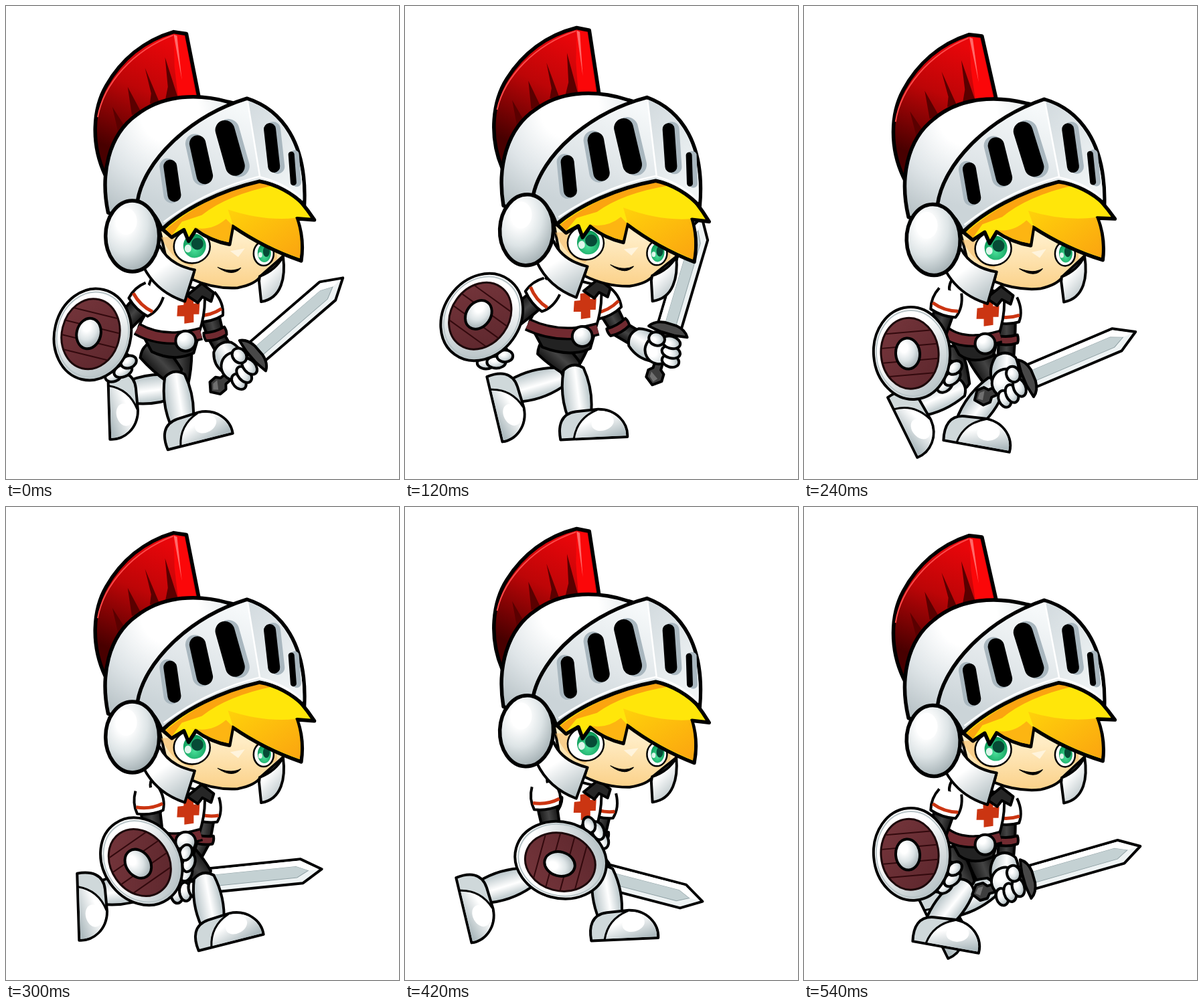
Recreate the animation shown at these times as an HTML page. Size 587 px wide and 707 px high, loop 0.6 s.

```html
<!DOCTYPE html>
<html lang="en">
<head>
<meta charset="utf-8">
<title>Running knight</title>
<style>
html, body { margin: 0; width: 100%; height: 100%; overflow: hidden; background: #fff; }
svg { display: block; width: 587px; height: 707px; }
.o { stroke: #000; stroke-width: 4; stroke-linejoin: round; }
.h { stroke: #000; stroke-width: 5.5; stroke-linejoin: round; }
.l { fill: none; stroke: #000; stroke-width: 3; stroke-linecap: round; }
</style>
</head>
<body>
<svg viewBox="0 0 587 707">
<defs>
  <linearGradient id="steel" x1=".2" y1="0" x2=".8" y2="1"><stop offset=".35" stop-color="#fff"/><stop offset="1" stop-color="#aebbbf"/></linearGradient>
  <linearGradient id="tube" x1="0" y1="0" x2="0" y2="1"><stop offset=".1" stop-color="#c3ced1"/><stop offset=".45" stop-color="#fff"/><stop offset="1" stop-color="#b4c1c5"/></linearGradient>
  <linearGradient id="dark" x1="0" y1="0" x2="0" y2="1"><stop offset="0" stop-color="#151515"/><stop offset=".5" stop-color="#444"/><stop offset="1" stop-color="#161616"/></linearGradient>
  <radialGradient id="ball" cx=".36" cy=".3" r=".78"><stop offset=".2" stop-color="#fff"/><stop offset=".55" stop-color="#dde4e6"/><stop offset="1" stop-color="#99a6aa"/></radialGradient>
  <radialGradient id="dome" gradientUnits="userSpaceOnUse" cx="245" cy="160" r="175"><stop offset=".25" stop-color="#fff"/><stop offset=".6" stop-color="#dfe5e8"/><stop offset="1" stop-color="#b2bdc1"/></radialGradient>
  <linearGradient id="visor" gradientUnits="userSpaceOnUse" x1="330" y1="145" x2="270" y2="310"><stop offset="0" stop-color="#f6f9fa"/><stop offset=".6" stop-color="#dfe5e8"/><stop offset="1" stop-color="#cbd4d8"/></linearGradient>
  <linearGradient id="side" x1="0" y1="0" x2=".7" y2="1"><stop offset="0" stop-color="#d2dade"/><stop offset="1" stop-color="#f1f5f6"/></linearGradient>
  <linearGradient id="plume" gradientUnits="userSpaceOnUse" x1="235" y1="50" x2="165" y2="215"><stop offset="0" stop-color="#e8060a"/><stop offset=".45" stop-color="#bd0507"/><stop offset="1" stop-color="#480000"/></linearGradient>
  <linearGradient id="skin" x1="0" y1="0" x2="0" y2="1"><stop offset=".3" stop-color="#ffecc4"/><stop offset="1" stop-color="#fbd189"/></linearGradient>
  <linearGradient id="fringe" x1="0" y1="0" x2="1" y2="1"><stop offset="0" stop-color="#ffd20a"/><stop offset="1" stop-color="#fba410"/></linearGradient>
  <radialGradient id="iris" cx=".5" cy=".65" r=".6"><stop offset="0" stop-color="#4be09a"/><stop offset="1" stop-color="#0a9a58"/></radialGradient>
  <linearGradient id="wood" x1="0" y1="0" x2="1" y2="1"><stop offset="0" stop-color="#76363c"/><stop offset="1" stop-color="#5c262c"/></linearGradient>
  <g id="boot">
    <path class="o" fill="#cfd8da" d="M-50,21C-53,0 -48,-18 -25,-20L8,-22C35,-21 52,0 50,21Z"/>
    <path fill="url(#steel)" d="M-29,19Q-22,-12 8,-20C34,-19 49,0 48,19Z"/>
    <ellipse cx="14" cy="-2" rx="17" ry="12" fill="#fff" transform="rotate(-14 14 -2)"/>
    <path class="l" d="M-30,20Q-24,-10 6,-21"/>
  </g>
  <g id="sleeve">
    <path class="o" fill="#fff" d="M-15,-17Q5,-26 22,-19Q27,0 21,20Q4,25 -13,17"/>
    <path fill="none" stroke="#cb3512" stroke-width="5" d="M12,-20Q18,0 11,20"/>
  </g>
</defs>
<g id="swordArm">
  <path id="armUpper" class="o" fill="url(#dark)"/>
  <path id="armLower" class="o" fill="url(#dark)"/>
  <path id="band" class="o" fill="#712a30" d="M-8,-16Q-2,-18 4,-16Q9,0 4,16Q-2,18 -8,16Q-4,0 -8,-16Z"/>
  <use id="sleeveR" href="#sleeve"/>
  <path id="gauntlet" class="o" fill="url(#tube)"/>
  <g id="sword">
    <path class="o" fill="#3e3e3e" d="M0,-6H-62L-67,-12H-78L-87,0L-78,12H-67L-62,6H0Z"/>
    <path fill="#707070" d="M-68,-7H-76L-82,0L-76,5Z"/>
    <path class="o" fill="#eef3f4" d="M4,-18H144L174,0L144,18H4Z"/>
    <path fill="#c4d1d3" stroke="#8fa0a4" d="M6,-8H136L154,0L136,9H6Z"/>
    <path fill="#fff" d="M6,-16H143L169,0L154,0L136,-8H6Z"/>
    <path class="o" fill="#484848" d="M-4,-30Q6,-24 8,-9V9Q6,24 -4,30Q-6,18 -7,10V-10Q-6,-20 -4,-30Z"/>
    <circle class="o" cx="-34" cy="-5" r="21" fill="url(#ball)"/>
    <ellipse class="o" cx="-45" cy="16" rx="9" ry="13" fill="url(#ball)"/>
    <ellipse class="o" cx="-32" cy="13" rx="9" ry="14" fill="url(#ball)"/>
    <ellipse class="o" cx="-18" cy="9" rx="9" ry="14" fill="url(#ball)"/>
    <ellipse class="o" cx="-19" cy="-13" rx="10" ry="12" fill="url(#ball)"/>
  </g>
</g>
<g id="legs">
  <path id="thighF" class="o" fill="url(#dark)"/>
  <path id="shinF" class="o" fill="url(#tube)"/>
  <use id="footF" href="#boot"/>
  <path id="thighN" class="o" fill="url(#dark)"/>
  <path id="shinN" class="o" fill="url(#tube)"/>
  <use id="footN" href="#boot"/>
</g>
<g id="torso">
  <path id="hips" class="o" fill="#222"/>
  <path id="tunic" class="o" fill="#fff"/>
  <path id="beltLine" fill="none" stroke="#000" stroke-width="20"/>
  <path id="belt" fill="none" stroke="#712a30" stroke-width="13"/>
  <path fill="#cb3512" d="M265,436L279,434L280,444L289,443L288,460L280,460L280,472L266,474L266,463L255,463L256,447L265,446Z"/>
  <path class="o" fill="#262626" d="M270,432L292,414L310,428L306,441L293,434L286,443Z"/>
  <circle class="o" cx="268" cy="500" r="15" fill="url(#ball)"/>
</g>
<path id="shieldUpper" class="o" fill="url(#dark)"/>
<use id="sleeveL" href="#sleeve"/>
<g id="shield">
  <ellipse class="o" cx="49" cy="33" rx="20" ry="18" fill="url(#ball)"/>
  <ellipse class="o" cx="45" cy="52" rx="13" ry="9" fill="url(#ball)" transform="rotate(-35 45 52)"/>
  <ellipse class="o" cx="57" cy="42" rx="14" ry="9" fill="url(#ball)" transform="rotate(-35 57 42)"/>
  <ellipse class="o" cx="62" cy="27" rx="12" ry="9" fill="url(#ball)" transform="rotate(-35 62 27)"/>
  <ellipse class="o" rx="57" ry="69" fill="url(#steel)"/>
  <ellipse rx="53" ry="64" fill="none" stroke="#b9c5c8" stroke-width="2"/>
  <ellipse cx="-3" rx="43" ry="53" fill="url(#wood)" stroke="#1c0709" stroke-width="3"/>
  <path fill="none" stroke="#32090d" stroke-width="2" d="M-36,-32H30M-44,-11H38M-44,11H38M-36,32H30"/>
  <ellipse class="o" cx="-6" rx="18" ry="23" stroke-width="3" fill="url(#ball)"/>
</g>
<g id="head">
  <path class="h" fill="url(#plume)" d="M148,252C126,205 130,152 150,118C172,80 206,51 251,38L270,41L288,134L240,160L160,255Z"/>
  <path fill="none" stroke="#ff4a4a" stroke-width="2" d="M137,165C146,115 190,66 250,43"/>
  <path fill="#fb0709" d="M251,42L267,45L284,134H257L252,90Z"/>
  <path fill="#ff6a6a" d="M251,42L256,44L263,110Z"/>
  <path fill="#5a0000" d="M238,76L258,140H238L242,120ZM208,92L230,145H215L217,130ZM182,120L202,158L188,162ZM159,150L178,180L168,190Z"/>
  <path class="h" fill="url(#dome)" d="M152,308C140,250 153,192 195,162C236,130 290,131 332,143L360,150L240,340Z"/>
  <path class="o" fill="url(#skin)" d="M228,330L238,375Q262,396 280,396L277,408Q310,423 345,421Q372,416 380,403L413,374L412,320Z"/>
  <path fill="#f6bd6a" d="M231,345Q247,380 277,389L284,380Q258,376 250,344ZM372,355Q370,385 388,389L404,379V350Z" opacity=".6"/>
  <path fill="#fff4dc" d="M334,366L356,362L346,375Z"/>
  <ellipse cx="277" cy="359" rx="27" ry="25" fill="#fff" stroke="#000" stroke-width="2.5"/>
  <ellipse cx="281" cy="358" rx="17" ry="18" fill="url(#iris)"/>
  <circle cx="285" cy="355" r="9" fill="#064b36"/>
  <ellipse cx="271" cy="362" rx="5" ry="6" fill="#fff" opacity=".85"/>
  <ellipse cx="384" cy="370" rx="15" ry="18" fill="#fff" stroke="#000" stroke-width="2.5"/>
  <ellipse cx="385" cy="369" rx="10" ry="14" fill="url(#iris)"/>
  <ellipse cx="388" cy="367" rx="5" ry="8" fill="#064b36"/>
  <ellipse cx="379" cy="372" rx="3" ry="4" fill="#fff" opacity=".85"/>
  <path d="M315,390Q336,399 350,391Q338,406 315,390Z" stroke="#000"/>
  <path class="o" fill="url(#steel)" d="M205,390L229,358Q242,386 281,394L266,441Q224,427 205,390Z"/>
  <path class="o" fill="url(#steel)" d="M377,411L378,404Q402,395 413,374C417,405 411,437 380,442Z"/>
  <path class="h" fill="#ffe60a" d="M233,333L247,345L265,334L272,351L283,334Q306,351 333,356L338,329Q385,362 440,381Q445,348 434,318L460,320Q450,305 440,293C425,276 400,264 378,262C320,275 262,303 233,333Z"/>
  <path fill="#fba410" d="M238,333Q300,282 378,264L400,268Q330,282 292,312L262,322L247,342Z"/>
  <path fill="#fdb512" d="M275,330Q305,338 328,318L337,327L332,353Q305,348 283,331Z"/>
  <path fill="url(#fringe)" d="M331,304Q385,322 432,317Q442,345 438,377Q385,358 338,326Z"/>
  <path class="h" fill="url(#visor)" d="M196,290C206,232 272,165 360,138C412,155 450,205 445,298C428,280 402,266 378,262C320,275 265,303 232,333Q222,305 196,290Z"/>
  <path fill="url(#side)" d="M361,141C410,158 444,205 443,291C427,277 402,263 379,259Z"/>
  <path fill="none" stroke="#fff" stroke-width="2.5" d="M361,142L379,256M235,322Q300,274 377,255Q415,264 440,287"/>
  <g id="slots" fill="none" stroke-linecap="round"></g>
  <ellipse class="h" cx="188" cy="343" rx="40" ry="53" fill="url(#ball)"/>
  <ellipse cx="179" cy="321" rx="16" ry="20" fill="#fff"/>
</g>
</svg>
<script>
const $ = id => document.getElementById(id);
const STEP = 60, COUNT = 10, RAD = Math.PI / 180;
const cos = deg => Math.cos(deg * RAD), sin = deg => Math.sin(deg * RAD);
const poly = (x, ...k) => k.reduceRight((sum, v) => sum * x + v, 0);

const place = (id, [x, y, a = 0]) => $(id).setAttribute('transform', `translate(${x} ${y}) rotate(${a})`);
const draw = (id, d) => $(id).setAttribute('d', d);
const at = ([x, y, a], u, v) => [x + u * cos(a) - v * sin(a), y + u * sin(a) + v * cos(a)];
const mix = (p, q, t) => p.map((v, k) => v + (q[k] - v) * t);
const angle = (p, q) => Math.atan2(q[1] - p[1], q[0] - p[0]) / RAD;
const gap = (p, q) => Math.hypot(q[0] - p[0], q[1] - p[1]);

// Tapered tube from p to q: half widths a, b at the ends, m bulges the middle
function limb(id, p, q, a, m, b) {
  const n = gap(p, q);
  draw(id, `M0,${-a}Q${n / 2},${-m} ${n},${-b}Q${n + b * .8},0 ${n},${b}Q${n / 2},${m} 0,${a}Q${-a * .8},0 0,${-a}Z`);
  place(id, [...p, angle(p, q)]);
}

// Knee bends forward; an overlong reach stretches the leg straight
function kneeOf(hip, ankle, thigh = 55, shin = 72) {
  const n = gap(hip, ankle);
  if (n >= thigh + shin) return mix(hip, ankle, thigh / (thigh + shin));
  const along = (thigh ** 2 - shin ** 2 + n * n) / (2 * n);
  const bend = Math.sqrt(Math.max(0, thigh ** 2 - along ** 2));
  return at([...hip, angle(hip, ankle)], along, -bend);
}

// Both feet run the same loop, half a turn apart
function leg(side, hip, phase, shift) {
  const foot = [
    197 + shift + 102 * cos(phase - 40) + 14 * cos(2 * phase - 45),
    617 + 19 * cos(phase - 28) + 14 * cos(2 * phase + 103),
    37 - 57 * cos(phase - 26)
  ];
  const ankle = at(foot, -20, -12), knee = kneeOf(hip, ankle);
  limb('thigh' + side, hip, knee, 19, 20, 14);
  limb('shin' + side, knee, ankle, 15, 26, 17);
  place('foot' + side, foot);
}

function body(c, off, sway) {
  const w = poly(c, 59, 17, 5), left = 268 - w;
  place('torso', sway);
  const belt = `M${left - 2},482Q235,505 291,489`;
  draw('belt', belt);
  draw('beltLine', belt);
  draw('hips', `M${left + 6},490H288L280,518Q250,532 ${left + 20},516Z`);
  draw('tunic', `M${left},482C${left + 3},466 ${left + 18},456 ${left + 17},440Q208,422 218,405L296,425Q299,455 288,488Q240,500 ${left},482Z`);
}

function swordArm(c, s, off) {
  const blade = [335 + 62 * c, poly(c, 555, -33, -45), poly(c, -19.5, -28, -11, -19) - 3.5 * s];
  const shoulder = off(299, 446), elbow = [303 + 17 * c, poly(c, 500, -5, -15)];
  const hand = at(blade, -36, -8), turn = angle(shoulder, elbow);
  limb('armUpper', shoulder, elbow, 14, 14, 12);
  limb('armLower', elbow, hand, 12, 12, 12);
  limb('gauntlet', mix(elbow, hand, .4), hand, 15, 25, 18);
  place('sleeveR', [...shoulder, turn]);
  place('band', [...elbow, turn]);
  place('sword', blade);
  // The arm passes behind the legs when it swings back
  $('torso').parentNode.insertBefore($('swordArm'), c > -.3 ? $('torso') : $('legs'));
}

function shieldArm(c, off) {
  const disc = [poly(c, 161, -62, 14), poly(c, 519, -33, -25), poly(c, -5, 31, -16, 30)];
  const shoulder = off(212, 434), elbow = at(disc, 40, -25);
  limb('shieldUpper', shoulder, elbow, 14, 15, 13);
  place('sleeveL', [...shoulder, angle(shoulder, elbow)]);
  place('shield', disc);
}

function pose(i) {
  const phase = i * 360 / COUNT, swing = phase - 54;
  const c = cos(swing), s = sin(swing);
  const lift = cos(2 * swing) + .2;
  const sway = [-3.2 * lift, -6 * lift];
  const off = (x, y) => [x + sway[0], y + sway[1]];
  $('head').setAttribute('transform', `translate(${-4 * lift} ${-3.8 * lift}) rotate(${2.2 * lift} 300 280)`);
  body(c, off, sway);
  leg('F', off(258, 512), phase + 180, 46);
  leg('N', off(214, 512), phase, 0);
  swordArm(c, s, off);
  shieldArm(c, off);
}

function slot(x, y, dx, dy, w, shift) {
  const line = (color, width, sx) =>
    `<path stroke="${color}" stroke-width="${width}" d="M${x + sx},${y}l${dx},${dy}"/>`;
  $('slots').innerHTML += line('#a9b7bf', w + 4, shift) + line('#000', w, 0);
}
for (let k = 0; k < 3; k++) slot(245 + 41 * k, 239 - 41 * k + 7 * k * k, 6 + 4.5 * k, 43 + 5.5 * k, 20 + 4.5 * k, k < 2 ? -4 : 5);
for (let k = 0; k < 2; k++) slot(394 + 32 * k, 184 + 38 * k, 6 - 3 * k, 56 - 14 * k, 18 - 9 * k, 5);

let shown = -1;
function tick() {
  const i = Math.floor(performance.now() / STEP) % COUNT;
  if (i !== shown) pose(shown = i);
  requestAnimationFrame(tick);
}
tick();
</script>
</body>
</html>
```
